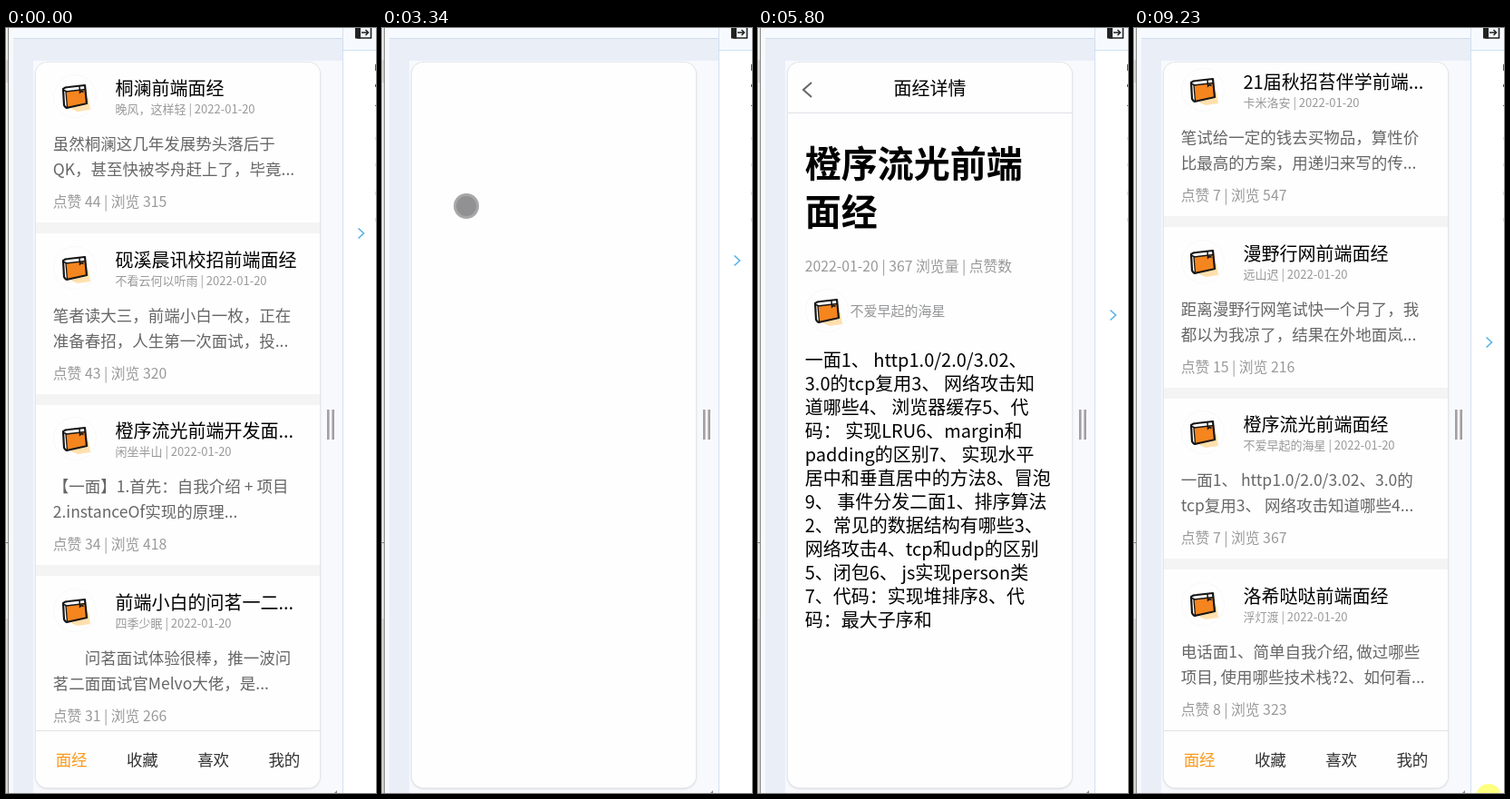
An HTML page for the animation above (9300 ms loop, 408x842 px).

```html
<!DOCTYPE html>
<html lang="zh-CN">
<head>
<meta charset="utf-8">
<title>面经</title>
<style>
html, body { margin: 0; width: 100%; height: 100%; overflow: hidden; background: #fff; }
body { font-family: "Noto Sans CJK SC", "Noto Sans CJK", "Noto Sans", sans-serif; text-spacing-trim: space-all; }
body *, #stage { position: absolute; }
#stage { left: 0; top: 0; width: 408px; height: 842px; overflow: hidden; }
#frame { left: 0; top: 0; }
#card { left: 33px; top: 38px; width: 313px; height: 798px; border-radius: 13px; overflow: hidden; background: #fefefe; }
#edge { left: 33px; top: 38px; width: 313px; height: 798px; border-radius: 13px; box-shadow: 0 0 0 1px #e6e6e8, 0 1px 3px #0003; }
#list, #detail { left: 0; top: 0; width: 313px; height: 798px; }
.item { left: 0; width: 313px; height: 176px; background: #fefefe; border-bottom: 12.5px solid #f4f4f4; }
.item > div, #detail > div, #nav > div { white-space: pre; }
.title { left: 87.5px; top: 14px; font-size: 20px; line-height: 28px; color: #000; }
.meta { left: 87.5px; top: 42.3px; font-size: 13px; line-height: 18px; color: #999; }
.text { left: 18.75px; top: 75px; font-size: 17.5px; line-height: 28px; color: #666; }
.foot { left: 18.75px; top: 143px; font-size: 15.8px; line-height: 20px; color: #999; }
.item svg { left: 19px; top: 13px; }
#nav { left: 0; top: 735px; width: 313px; height: 63px; background: #fefefe; border-top: 1px solid #e2e2e4; }
#nav > div { width: 78.25px; top: 17px; text-align: center; font-size: 17.5px; line-height: 28px; color: #323233; }
#nav > div:first-child { color: #fa9a1c; }
#thumb { left: 308px; width: 5px; height: 326px; background: #00000048; border-radius: 1px; }
#detail .bar { left: 0; top: 0; width: 313px; height: 55px; border-bottom: 1px solid #dfe1e6; text-align: center; font-size: 20px; line-height: 56px; }
#detail .head { left: 18.75px; top: 83px; width: 276px; white-space: normal; font-size: 40px; font-weight: bold; line-height: 52.5px; }
#detail .info { left: 18.75px; top: 214px; font-size: 15.8px; line-height: 20px; color: #999; }
#detail .author { left: 68.5px; top: 263px; font-size: 15px; line-height: 20px; color: #969799; }
#detail .body { left: 18.75px; top: 314px; font-size: 20px; line-height: 26px; color: #000; }
#detail .avatar { left: 19px; top: 249px; }
#detail .back { left: 14px; top: 19px; }
#cursor { width: 28px; height: 28px; margin: -14px; border-radius: 50%; box-sizing: border-box; }
#cursor.touch { background: #6e6e70c0; border: 3px solid #b4b4b4a0; }
#cursor.glow { background: radial-gradient(#aaaa28e0 35%, #d2d23cc0 62%, #e6e650a0); }
#cursor.outside { background: #ffff80; }
</style>
</head>
<body>
<div id="stage">
  <svg id="frame" width="408" height="842" fill="none">
    <path fill="#f1f0f0" d="M0 0h2v842h-2z"/>
    <path fill="#dcd8d4" d="M0 35h2v25h-2zM0 650h2v192h-2z"/>
    <path fill="#858585" d="M2 0h1.3v842h-1.3zM0 566h2v1h-2z"/>
    <path fill="#f8f9fb" d="M3.3 0h4.7v842h-4.7z"/>
    <path fill="#f6f9fd" d="M8 0h363v11h-363zM372 0h36v24h-36z"/>
    <path fill="#e9eef7" d="M8 12h363v24h-363zM8 36h22v806h-22z"/>
    <path fill="#f7f9fd" d="M30 36h341v806h-341z"/>
    <path stroke="#d3dfee" d="M8 11.5h363M371.5 0v842"/>
    <path stroke="#c9e0f5" d="M372 24.5h36"/>
    <path fill="#a39ea3" d="M354 420h2.6v33h-2.6zM359.4 420h2.6v33h-2.6z"/>
    <path fill="#888" d="M362 842l3-3v3z"/>
    <path stroke="#222" stroke-width="1.6" d="M388-1h14.5v12h-14.5z"/>
    <path fill="#222" d="M385-2h6v13.5h-6z"/>
    <path stroke="#222" stroke-width="1.5" d="M392 5h7M396.500 2l3 3l-3 3"/>
    <path stroke="#555" d="M407.500 40v7M407 85.500h1M407.500 62v3"/>
    <path stroke="#ddd" d="M407.500 120v3M407.500 149v3M407.500 180v4M407.500 209v4"/>
    <path id="prompt" stroke-width="1.5" d="M388.500-5.500l6 5.500l-6 5.500"/>
  </svg>
  <div id="edge"></div>
  <div id="card">
    <div id="list"><div id="scroller"></div><div id="nav"></div><div id="thumb"></div></div>
    <div id="detail"></div>
  </div>
  <div id="cursor"></div>
</div>
<script>
const LOOP = 9300, PITCH = 188.5, MAX_SCROLL = 1138, MID_SCROLL = 620;
const $ = id => document.getElementById(id);
const avatar = (size, cls = '') => `<svg class="${cls}" width="${size}" height="${size}" viewBox="0 0 48 48" fill="none">
  <circle cx="24" cy="24" r="23.500" fill="#fefefe" stroke="#f8f8f8"/>
  <path fill="#ffe0ad" d="M30 30l9-4l2 13l-14 2l-7-3z"/>
  <path fill="#fff" stroke="#151515" stroke-width="2.200" stroke-linejoin="round" d="M11 16q2-2 6-2l18-2l2 20l-22 5q-2-1-3-3z"/>
  <path fill="#f5851f" stroke="#151515" stroke-width="1.300" d="M14 19l21-2.500l1.500 15.500l-21 4.500z"/>
  <path stroke="#151515" stroke-width="1.500" d="M12 17.500l3 1.500M29 13l.5 7l2-1.500l2 1"/></svg>`;

const item = (title, user, text, likes, views, full = title) => ({ title, user, text, likes, views, full });
const items = [
  item('桐澜前端面经', '晚风，这样轻', '虽然桐澜这几年发展势头落后于\nQK，甚至快被岑舟赶上了，毕竟...', 44, 315),
  item('砚溪晨讯校招前端面经', '不看云何以听雨', '笔者读大三，前端小白一枚，正在\n准备春招，人生第一次面试，投...', 43, 320),
  item('橙序流光前端开发面...', '闲坐半山', '【一面】1.首先：自我介绍 + 项目\n2.instanceOf实现的原理...', 34, 418, '橙序流光前端开发面经'),
  item('前端小白的问茗一二...', '四季少眠', '　　问茗面试体验很棒，推一波问\n茗二面面试官Melvo大佬，是...', 31, 266),
  item('前端实习生一面面经', '半盏清茶', '一面1、自我介绍2、说说项目中的\n难点3、盒模型4、事件循环...', 22, 305),
  item('春招前端岗位面经', '云边小舟', '面试官人很好，先聊了聊项目，再\n问基础知识，最后写了两道...', 18, 284),
  item('21届秋招苔伴学前端...', '卡米洛安', '笔试给一定的钱去买物品，算性价\n比最高的方案，用递归来写的传...', 7, 547),
  item('漫野行网前端面经', '远山迟', '距离漫野行网笔试快一个月了，我\n都以为我凉了，结果在外地面岚...', 15, 216),
  item('橙序流光前端面经', '不爱早起的海星', '一面1、 http1.0/2.0/3.02、3.0的\ntcp复用3、 网络攻击知道哪些4...', 7, 367),
  item('洛希哒哒前端面经', '浮灯渡', '电话面1、简单自我介绍, 做过哪些\n项目, 使用哪些技术栈?2、如何看...', 8, 323),
];

const bodies = {
  2: `【一面】1.首先：自我介绍 +
项目2.instanceOf实现的原理
3.原型链和继承的几种方式4.
闭包的应用场景5.事件循环，
宏任务和微任务的区别6.实现
防抖和节流7.浏览器缓存策略
8.跨域的解决方案【二面】1.
介绍项目难点2.vue响应式原
理3.虚拟DOM和diff算法4.
组件之间如何通信5.路由的两
种模式6.实现Promise.all7.
输入网址到页面显示的过程8.
算法：二叉树的层序遍历9.代
码：数组去重和扁平化`,
  4: `一面1、自我介绍2、说说项目
中的难点3、盒模型4、事件循
环5、flex布局的常用属性6、
水平垂直居中7、深拷贝和浅
拷贝8、this的指向9、箭头函
数和普通函数的区别10、数组
常用方法二面1、http状态码
2、三次握手3、性能优化4、
代码：实现快速排序5、代码：
反转链表`,
  8: `一面1、 http1.0/2.0/3.02、
3.0的tcp复用3、 网络攻击知
道哪些4、 浏览器缓存5、代
码： 实现LRU6、margin和
padding的区别7、 实现水平
居中和垂直居中的方法8、冒泡
9、 事件分发二面1、排序算法
2、常见的数据结构有哪些3、
网络攻击4、tcp和udp的区别
5、闭包6、 js实现person类
7、代码：实现堆排序8、代
码：最大子序和`,
  9: `电话面1、简单自我介绍, 做
过哪些项目, 使用哪些技术栈?
2、如何看待前端框架选型?3、
vue的双向绑定原理4、组件的
生命周期5、路由懒加载6、性
能优化做过哪些7、浏览器渲染
过程8、重绘和回流的区别9、
跨域如何解决10、http缓存
11、常见的网络攻击和防范12、
数组去重的方法13、实现一个
深拷贝14、Promise的理解15、
事件循环16、webpack的常用
配置和打包优化`,
};

$('scroller').innerHTML = items.map((a, i) => `<div class="item" style="top:${i * PITCH}px">${avatar(48)}
  <div class="title">${a.title}</div><div class="meta">${a.user} | 2022-01-20</div>
  <div class="text">${a.text}</div><div class="foot">点赞 ${a.likes} | 浏览 ${a.views}</div></div>`).join('');
$('nav').innerHTML = ['面经', '收藏', '喜欢', '我的'].map((s, i) => `<div style="left:${i * 78.25}px">${s}</div>`).join('');

let shown = -1;
function showDetail(index) {
  if (index === shown) return;
  shown = index;
  const a = items[index];
  $('detail').innerHTML = `<div class="bar">面经详情</div>
    <svg class="back" width="16" height="22" fill="none" stroke="#666" stroke-width="2"><path d="M12 3l-9 8l9 8"/></svg>
    <div class="head">${a.full}</div><div class="info">2022-01-20 | ${a.views} 浏览量 | 点赞数</div>
    ${avatar(48, 'avatar')}<div class="author">${a.user}</div><div class="body">${bodies[index]}</div>`;
}

// Each visit: tap time, page shown, back to list, article
const visits = [[700, 1030, 1800, 2], [3050, 3420, 3800, 4], [5380, 5540, 6500, 8], [7400, 7480, 8460, 9]];
// Pointer stops: time, x, y
const path = [
  [60, 385, 862], [490, 138, 480], [1030, 138, 480], [1510, 54, 70], [1780, 54, 70], [2080, 191, 409],
  [2400, 175, 205], [2750, 160, 300], [3050, 160, 300], [3340, 93, 196], [3670, 54, 71], [3800, 52, 64],
  [4300, 215, 600], [4490, 215, 600], [4770, 228, 467], [5540, 228, 467], [6200, 54, 60], [6560, 54, 60],
  [7340, 197, 681], [7500, 197, 677], [8100, 55, 66], [8480, 55, 66], [9230, 391, 846],
];

const progress = (t, from, to) => Math.min(1, Math.max(0, (t - from) / (to - from)));
const easeOut = p => 1 - (1 - p) ** 2;
const smooth = p => p * p * (3 - 2 * p);
const show = (id, on) => { $(id).style.display = on ? '' : 'none'; };

function pointerAt(t) {
  const i = Math.max(0, path.findLastIndex(k => k[0] <= t));
  const a = path[i], b = path[i + 1] || a;
  const p = a === b ? 0 : smooth(progress(t, a[0], b[0]));
  return [a[1] + (b[1] - a[1]) * p, a[2] + (b[2] - a[2]) * p];
}

function render(t) {
  const visit = visits.find(v => t >= v[0] && t < v[2]);
  const loaded = visit && t >= visit[1];
  show('list', !visit);
  show('detail', loaded);
  if (loaded) showDetail(visit[3]);

  const scroll = MID_SCROLL * easeOut(progress(t, 2110, 2680))
    + (MAX_SCROLL - MID_SCROLL) * easeOut(progress(t, 4490, 4750));
  $('scroller').style.transform = `translateY(${-scroll}px)`;
  $('thumb').style.top = scroll / MAX_SCROLL * 467 + 'px';
  show('thumb', (t > 2110 && t < 2760) || (t > 4490 && t < 5100));

  const logs = visits.filter(v => t >= v[1]).length;
  $('prompt').setAttribute('transform', `translate(0 ${226 + 30 * logs})`);
  $('prompt').setAttribute('stroke', logs === 2 ? '#909090' : '#55b0e6');

  const [x, y] = pointerAt(t);
  const cursor = $('cursor');
  cursor.style.transform = `translate(${x}px, ${y}px)`;
  cursor.className = x > 346 || y > 836 ? 'outside' : t < 490 || t > 6560 ? 'glow' : 'touch';
  show('cursor', t >= 60 && !(t > 5540 && t < 5880));
}

const start = performance.now();
function tick() {
  render((performance.now() - start) % LOOP);
  requestAnimationFrame(tick);
}
tick();
</script>
</body>
</html>
```
